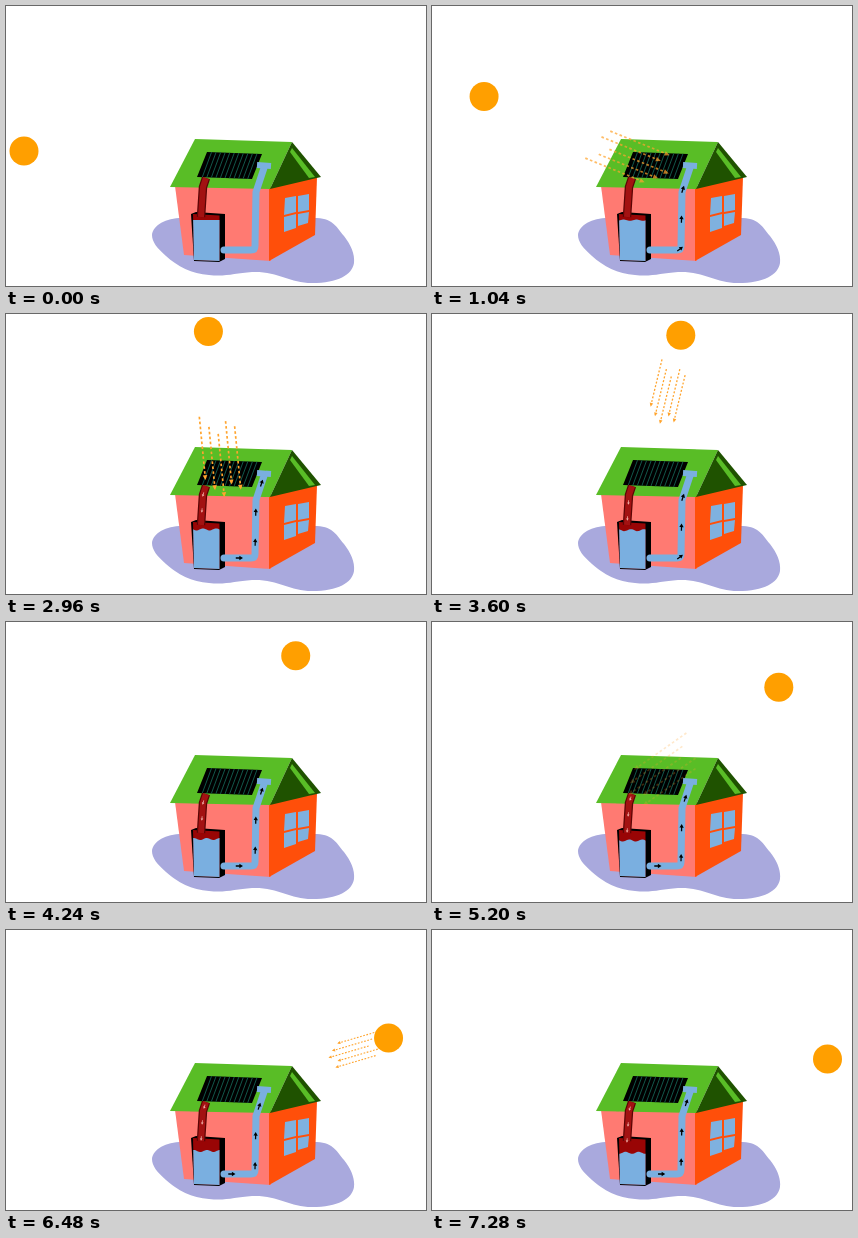
An HTML page for the animation above (7.36 s loop, 420 px wide and 280 px high).

```html
<!DOCTYPE html>
<html lang="en">
<head>
<meta charset="utf-8">
<title>Solar water heating</title>
<style>
  html, body { margin: 0; width: 100%; height: 100%; overflow: hidden; background: #fff; }
  svg { display: block; width: 420px; height: 280px; }
  .line { fill: none; stroke-linejoin: round; }
</style>
</head>
<body>
<svg viewBox="0 0 420 280">
  <defs>
    <path id="arrow" d="M-4-.7H0V-2.4L4 0 0 2.4V.7H-4Z"/>
    <clipPath id="face"><path d="M187 208L213.500 209.500V255L188 254Z"/></clipPath>
    <clipPath id="panelClip"><path d="M201 146L256 148 246 173 191 171Z"/></clipPath>
  </defs>

  <path fill="#a9a9dd" d="M146 229C147 219 160 212 176 212L311 212C328 213 331 222 338 230C345 239 349 248 348 257C346 269 332 277 306 277C283 277 272 265 246 266C229 267 220 271 203 269C186 268 171 260 160 250C151 242 146 236 146 229Z"/>
  <path fill="#ff7a72" d="M169 180H265V255L178 249Z"/>
  <path fill="#ff4f0a" d="M263 182L311 171 309 229 263 255Z"/>
  <path fill="#7fb1df" d="M279 192L290 190V206L278 209ZM292 190L303 188V204L292 206ZM278 211L290 208V222L278 226ZM292 208L303 206 302 217 292 220Z"/>
  <path fill="#59bd26" d="M189 133L286 136 264 183 164 181Z"/>
  <path fill="#1f5200" d="M286 136L315 171 264 183Z"/>
  <path fill="#59bd26" d="M286 142L309 171 303 172 284 146Z"/>

  <path d="M201 146L256 148 246 173 191 171Z"/>
  <path id="stripes" class="line" clip-path="url(#panelClip)" stroke="#12574a"/>

  <path d="M185 208L190 206 219 208V253L213 256 188 255Z"/>
  <g clip-path="url(#face)">
    <path fill="#990505" d="M186 208H214V256H186Z"/>
    <path id="water" fill="#7aafe0"/>
  </g>
  <path class="line" stroke="#5c0505" stroke-width="8.500" d="M200 172L197 181 195 211"/>
  <path id="hotPipe" class="line" stroke="#a31212" stroke-width="6" d="M200 172L197 181 195 211"/>
  <path id="coldPipe" class="line" stroke="#7aafe0" stroke-width="7" stroke-linecap="round" d="M218 244H245Q249 244 249 240L250 186 258 162"/>
  <path class="line" stroke="#7aafe0" stroke-width="6" d="M251 159L265 160"/>
  <g id="coldFlow"></g>
  <g id="hotFlow" fill="#f0b0a8"></g>
  <g id="rays" class="line" stroke="#ffa42e"></g>
  <circle id="sun" r="14.500" fill="#ff9f00"/>
</svg>

<script>
const STEP = 80, STEPS = 92;
const RAY_PERIOD = 12.7, RAY_START = 2.7, RAY_LENGTH = 62, RAY_GAP = 8.6;
const RAY_LAGS = [19, 8, 0, 12, 6];
const PANEL = { x: 216, y: 157 };
// Key points of the sun's arc
const ARC = [
  { n: 0, x: 18, y: 145 }, { n: 10, x: 38.5, y: 104.5 }, { n: 25, x: 121, y: 37 },
  { n: 40, x: 221, y: 17.5 }, { n: 60, x: 323.5, y: 48.5 }, { n: 70, x: 364, y: 83 },
  { n: 91, x: 395.5, y: 129 }
];

const $ = id => document.getElementById(id);
const clamp = v => Math.max(0, Math.min(1, v));
const degrees = (dx, dy) => Math.atan2(dy, dx) * 180 / Math.PI;

function slope(i, axis) {
  const a = ARC[Math.max(i - 1, 0)], b = ARC[Math.min(i + 1, ARC.length - 1)];
  return (b[axis] - a[axis]) / (b.n - a.n);
}

// Smooth Hermite curve through the key points
function along(n, axis) {
  let i = 0;
  while (i < ARC.length - 2 && n > ARC[i + 1].n) i++;
  const a = ARC[i], b = ARC[i + 1], h = b.n - a.n;
  const u = (n - a.n) / h, u2 = u * u, u3 = u2 * u;
  return (2 * u3 - 3 * u2 + 1) * a[axis] + (3 * u2 - 2 * u3) * b[axis]
    + h * ((u3 - 2 * u2 + u) * slope(i, axis) + (u3 - u2) * slope(i + 1, axis));
}

function drawFlow(group, pipe, { first, spacing, phase, front, size }) {
  const end = Math.min(pipe.getTotalLength(), front);
  let out = '';
  for (let d = first + spacing * (phase - Math.floor(phase)); d < end; d += spacing) {
    const p = pipe.getPointAtLength(d), q = pipe.getPointAtLength(d - 1);
    const angle = degrees(p.x - q.x, p.y - q.y);
    out += `<use href="#arrow" transform="translate(${p.x} ${p.y}) rotate(${angle}) scale(${size})"/>`;
  }
  group.innerHTML = out;
}

function ray(lag, i) {
  const side = (2 - i) * RAY_GAP, head = 38 - lag;
  return `<path stroke-width="1.7" stroke-dasharray="2.6 2.4" d="M${head - RAY_LENGTH} ${side}H${head}"/>`
    + `<path fill="#ffa42e" stroke="none" d="M${head + 2} ${side}l-5-2.3v4.6z"/>`;
}

// Rays leave the sun, grow on the way and fade out on the panel
function drawRays(n, sun) {
  const age = (n - RAY_START) % RAY_PERIOD;
  const p = Math.min(age * 0.1, 0.9), scale = 0.55 + 0.5 * p;
  const dx = PANEL.x - sun.x, dy = PANEL.y - sun.y;
  const rays = $('rays');
  rays.setAttribute('opacity', age < 0 ? 0 : clamp((12.1 - age) / 2.5));
  rays.setAttribute('transform',
    `translate(${sun.x + dx * p} ${sun.y + dy * p + 2}) rotate(${degrees(dx, dy)}) scale(${scale})`);
}

function drawWater(n) {
  const level = 214 + 9 * (n / STEPS) ** 2, swell = clamp(n / 20);
  let d = 'M186 256';
  for (let x = 186; x <= 214; x++) {
    d += `L${x} ${level + swell * Math.sin(x * 0.48 - n * 0.9)}`;
  }
  $('water').setAttribute('d', d + 'V256Z');
}

function draw() {
  const n = Math.floor(performance.now() / STEP) % STEPS;
  const sun = { x: along(n, 'x'), y: along(n, 'y') };
  const phase = 0.3125 * n - 0.25;
  $('sun').setAttribute('cx', sun.x);
  $('sun').setAttribute('cy', sun.y);
  drawRays(n, sun);
  drawWater(n);
  drawFlow($('coldFlow'), $('coldPipe'), { first: 6, spacing: 30, phase, front: (n - 2) * 10, size: 0.9 });
  drawFlow($('hotFlow'), $('hotPipe'), { first: 4, spacing: 16, phase, front: (n - 13) * 6, size: 0.55 });
  requestAnimationFrame(draw);
}

$('rays').innerHTML = RAY_LAGS.map(ray).join('');
$('stripes').setAttribute('d',
  Array.from({ length: 11 }, (_, i) => `M${205.6 + i * 4.6} 146l-10 27`).join(''));
draw();
</script>
</body>
</html>
```
